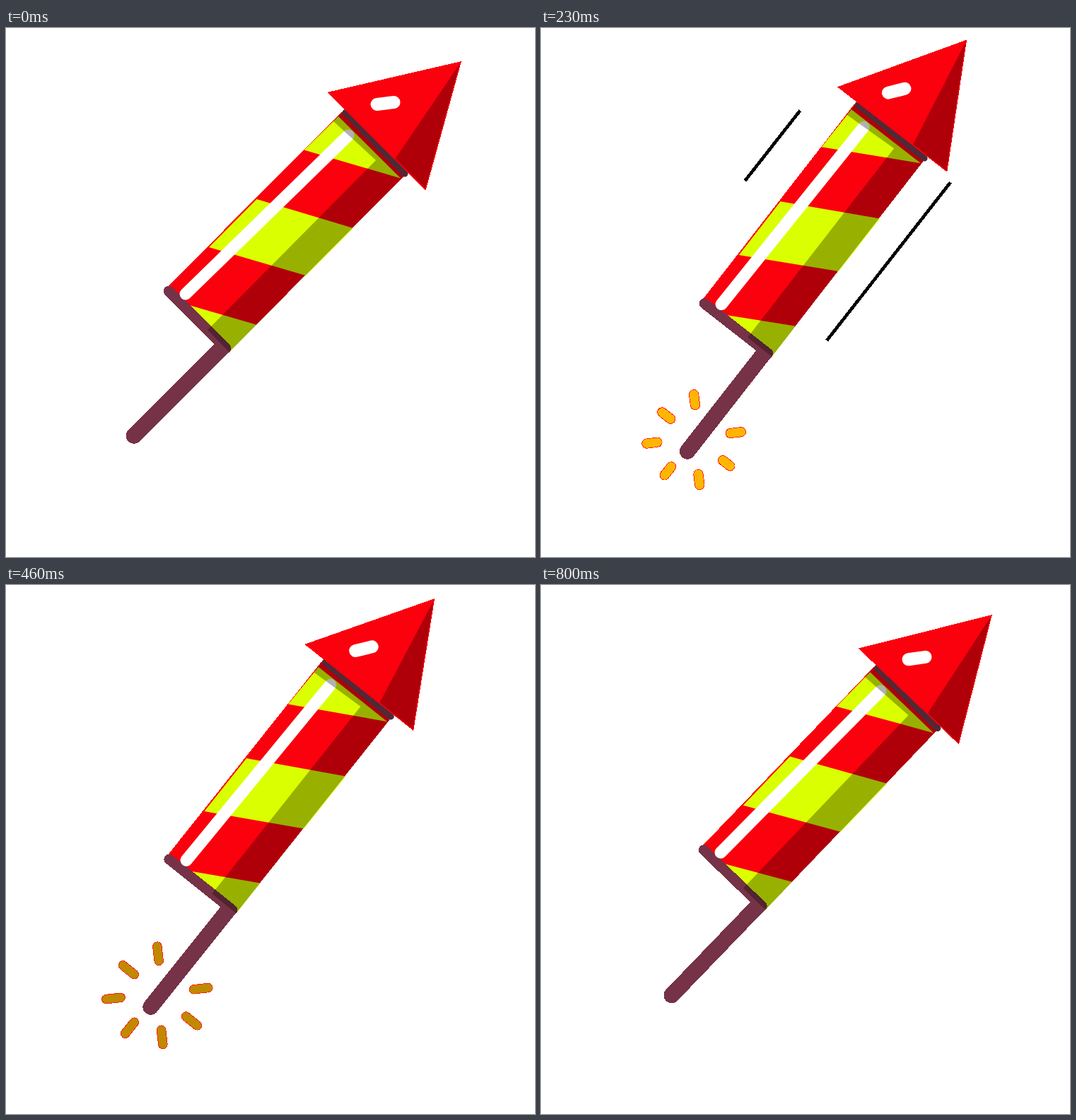
An HTML page that plays this animation: 748x748 px, repeating every 840 ms.

```html
<!DOCTYPE html>
<html lang="en">
<head>
<meta charset="utf-8">
<title>Firework rocket</title>
<style>
  html, body { margin: 0; width: 100%; height: 100%; overflow: hidden; background: #fff; }
  svg { display: block; width: 100vw; height: 100vh; }
  .red { fill: #fb000d; }
  .yellow { fill: #daff00; }
  .shade { fill: #000; fill-opacity: .305; }
  .line { fill: none; stroke-linecap: round; }
  .wood { stroke: #763247; }
  .white { stroke: #fff; }
  .red, .wood, #speed, #sparks { shape-rendering: crispEdges; }
</style>
</head>
<body>
<svg viewBox="0 0 748 748">
  <g id="rocket">
    <!-- body -->
    <path class="red" d="M228 366.500 475 118 563.500 208.500 316.500 457Z"/>
    <path class="yellow" d="M421.500 172.500 470 125 558 212.500Z"/>
    <path class="yellow" d="M354.500 242 491 283 424 350 287 310Z"/>
    <path class="yellow" d="M252 390 354 419.500 317 457Z"/>

    <!-- stick and base -->
    <path class="line wood" stroke-width="22.500" d="M181 576.500 300 457.500"/>
    <path class="wood" stroke-width="22.500" d="M299 458.500 306 451.500"/>
    <path class="line wood" stroke-width="14.500" d="M230 372 311 453"/>

    <!-- gloss and shadow -->
    <path class="line white" stroke-width="17" d="M254 376 484 152"/>
    <path class="shade" d="M463 132 523 187 285 427 314 456.500 317 457 563.500 208.500 475 118Z"/>

    <!-- nose -->
    <path class="line" stroke="#512936" stroke-width="9" d="M480 119.500 564 206"/>
    <path class="red" d="M454 91 644 47 593.500 229.500Z"/>
    <path class="shade" d="M642 50 550.500 184.500 593 227Z"/>
    <path class="line white" stroke-width="18" d="M524.500 108 548.500 105"/>

    <g id="speed" stroke="#000" stroke-width="4.600">
      <path d="M397.700 117.800 308.500 206.600"/>
      <path d="M596.500 244.300 395.700 445"/>
    </g>
    <g id="sparks"></g>
  </g>
</svg>
<script>
  const LOOP = 840, PEAK = 9, LAST = 24;
  const byId = id => document.getElementById(id);
  const rocket = byId('rocket'), speed = byId('speed'), sparks = byId('sparks');
  const clamp = v => Math.min(1, Math.max(0, v));

  function add(parent, tag, attrs) {
    const el = document.createElementNS('http://www.w3.org/2000/svg', tag);
    for (const key in attrs) el.setAttribute(key, attrs[key]);
    return parent.appendChild(el);
  }

  // Seven rays around the stick's end; the upper two sit closer to the stick.
  const rays = [0, 45, 90, 135, 180, 225, 270].map(angle => {
    const near = angle > 180;
    const x = 192.3 + (near ? 7.4 : 0), y = 558.6 + (near ? 6.4 : 0);
    const g = add(sparks, 'g', { transform: `translate(${x} ${y}) rotate(${angle})` });
    const edge = add(g, 'path', { class: 'line', stroke: '#ff1a00' });
    const core = add(g, 'path', { class: 'line' });
    return { edge, core, rate: angle === 45 ? .85 : 1 };
  });

  function draw(now) {
    const step = Math.min(LAST, Math.floor((now % LOOP + 4) / 33.1));

    const tilt = step <= PEAK ? -step : -PEAK * (26 - step) / (26 - PEAK);
    rocket.setAttribute('transform', `rotate(${tilt} 374 374)`);

    speed.style.display = step >= 4 && step <= 12 ? '' : 'none';
    sparks.style.display = step >= 2 && step <= 17 ? '' : 'none';

    // Rays grow longer and a little thinner, then darken.
    const light = clamp(1 - .07 * (step - 10.5));
    const color = `rgb(${255 * light}, ${182 * light}, 0)`;
    const width = 16 - .25 * Math.min(step, 10);
    for (const { edge, core, rate } of rays) {
      const d = `M52 0h${.5 + 20 * clamp((step - 2) * rate / 6.8)}`;
      edge.setAttribute('d', d);
      edge.setAttribute('stroke-width', width);
      core.setAttribute('d', d);
      core.setAttribute('stroke-width', width - 1.8);
      core.setAttribute('stroke', color);
    }
    requestAnimationFrame(draw);
  }
  draw(performance.now());
</script>
</body>
</html>
```
